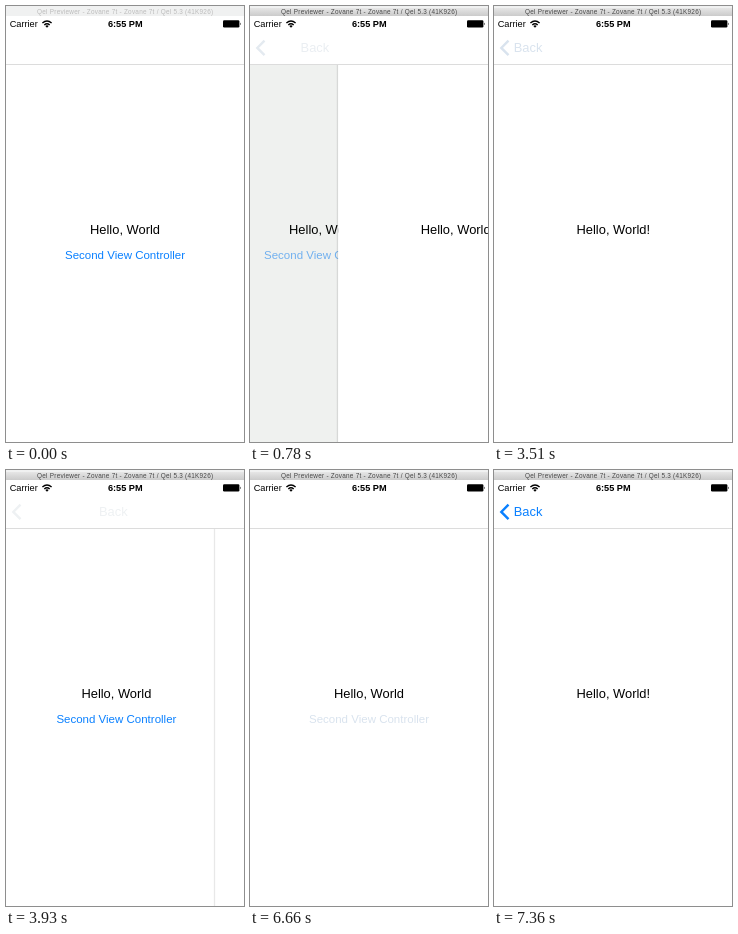
These frames come from a looping animation (238x436 px, 8000 ms). An HTML page:

```html
<!DOCTYPE html>
<html lang="en">
<head>
<meta charset="utf-8">
<title>Navigation push and pop</title>
<style>
  html, body { margin: 0; width: 100%; height: 100%; overflow: hidden; background: #fff; }
  svg { display: block; width: 100%; height: 100%; }
  text { font-family: "Liberation Sans", Arial, Helvetica, sans-serif; }
  .mid { text-anchor: middle; }
  .body { font-size: 12.9px; }
  .status { font-size: 9.2px; }
</style>
</head>
<body>
<svg viewBox="0 0 238 436">
  <defs>
    <linearGradient id="bar" x2="0" y2="1">
      <stop stop-color="#e6e6e6"/><stop offset="1" stop-color="#cbcbcb"/>
    </linearGradient>
    <linearGradient id="edge">
      <stop stop-opacity="0"/><stop offset="1" stop-opacity=".15"/>
    </linearGradient>
  </defs>
  <rect width="238" height="436" fill="#fff"/>

  <g id="first">
    <text class="mid body" x="119" y="228">Hello, World</text>
    <text id="link" class="mid" x="119" y="253" font-size="11.5">Second View Controller</text>
  </g>
  <rect id="dim" y="58" width="238" height="378" fill="#00200f"/>
  <g id="second">
    <rect x="-2" y="59" width="2" height="377" fill="url(#edge)"/>
    <rect y="58" width="238" height="378" fill="#fff"/>
    <text class="mid body" x="119.3" y="228">Hello, World!</text>
  </g>

  <rect y="10" width="238" height="48" fill="#fff"/>
  <rect y="58" width="238" height="1" fill="#dcdcdc"/>
  <path id="chevron" d="M14.5 34.6L7.3 41.9L14.5 49.2" fill="none" stroke-width="2.4"/>
  <text id="back" class="body" y="46.3">Back</text>

  <text class="status" x="3.7" y="21.2">Carrier</text>
  <path d="M36.4 17Q41 12.8 45.6 17M38.3 18.9Q41 16.5 43.7 18.9" fill="none" stroke="#000" stroke-width="1.4"/>
  <path d="M39.3 20Q41 18.7 42.7 20L41 21.8Z"/>
  <text class="status mid" x="119.3" y="21.2" font-weight="bold">6:55 PM</text>
  <rect x="217" y="14.3" width="16.4" height="7.2" rx="1.2"/>
  <path d="M234 16.5Q235.5 17.9 234 19.3Z"/>

  <rect width="238" height="10" fill="#f0f1f1"/>
  <rect id="titleBar" y="2" width="238" height="8" fill="url(#bar)"/>
  <text id="title" class="mid" x="119.2" y="7.6" font-size="6.4" letter-spacing=".25">Qel Previewer - Zovane 7t - Zovane 7t / Qel 5.3 (41K926)</text>
</svg>
<script>
const LOOP = 8000, STEP = 70, WIDTH = 238, BLUE = [10, 128, 255];
const PRESSED = 0.2, BACK_X = 19.7, CENTER_X = 103;

// Each slide: touch down, first and last step, time already elapsed at the first step
const slides = [
  { down: 500, start: 710, end: 1200, lead: 47, push: true },
  { down: 3510, start: 3790, end: 4280, lead: 60, push: false },
  { down: 6660, start: 6800, end: 7360, lead: 20, push: true }
];

const el = id => document.getElementById(id);
const set = (id, name, value) => el(id).setAttribute(name, value);
const clamp = v => Math.max(0, Math.min(1, v));
const smooth = v => { v = clamp(v); return v * v * (3 - 2 * v); };
const spring = s => 1 - (1 + 18.26 * s) * Math.exp(-18.26 * s);

// Blue over white; faint tints lean towards grey
function tint(a) {
  const rgb = BLUE.map(c => 255 + (c - 255) * a);
  const grey = 0.3 * rgb[0] + 0.59 * rgb[1] + 0.11 * rgb[2];
  const sat = clamp(a * 2.2);
  return `rgb(${rgb.map(c => Math.round(grey + (c - grey) * sat))})`;
}

function stateAt(t) {
  const s = { cover: 0, link: 1, label: 0, chevron: 0, dim: 0 };
  for (const m of slides) {
    if (t < m.down) break;
    if (t < m.start) {
      if (m.push) s.link = PRESSED;
      else s.label = s.chevron = PRESSED;
      break;
    }
    const done = t >= m.end;
    const sec = (Math.floor((t - m.start) / STEP) * STEP + m.lead) / 1000;
    const p = done ? 1 : spring(sec);
    if (m.push) {
      s.cover = p;
      s.dim = 0.1 * p;
      s.link = PRESSED + (1 - PRESSED) * clamp(sec / 0.27);
      s.label = done ? 1 : smooth(sec / 0.54);
      s.chevron = done ? 1 : smooth(sec / 0.48);
    } else {
      s.cover = 1 - p;
      s.dim = 0;
      s.link = 1;
      s.label = s.chevron = done ? 0 : PRESSED * (1 - smooth(sec / 0.4));
    }
  }
  return s;
}

function draw(t) {
  const s = stateAt(t), active = t >= slides[0].down;
  set("first", "transform", `translate(${-0.3 * WIDTH * s.cover} 0)`);
  set("second", "transform", `translate(${WIDTH * (1 - s.cover)} 0)`);
  set("second", "visibility", s.cover > 0 ? "visible" : "hidden");
  set("dim", "opacity", s.dim);
  set("link", "fill", tint(s.link));
  set("back", "x", BACK_X + (CENTER_X - BACK_X) * (1 - s.cover));
  set("back", "fill", tint(s.label));
  set("chevron", "stroke", tint(s.chevron));
  set("titleBar", "opacity", active ? 1 : 0);
  set("title", "fill", active ? "#484848" : "#bcbcbc");
}

const begin = performance.now();
function tick() {
  draw((performance.now() - begin) % LOOP);
  requestAnimationFrame(tick);
}
tick();
</script>
</body>
</html>
```
